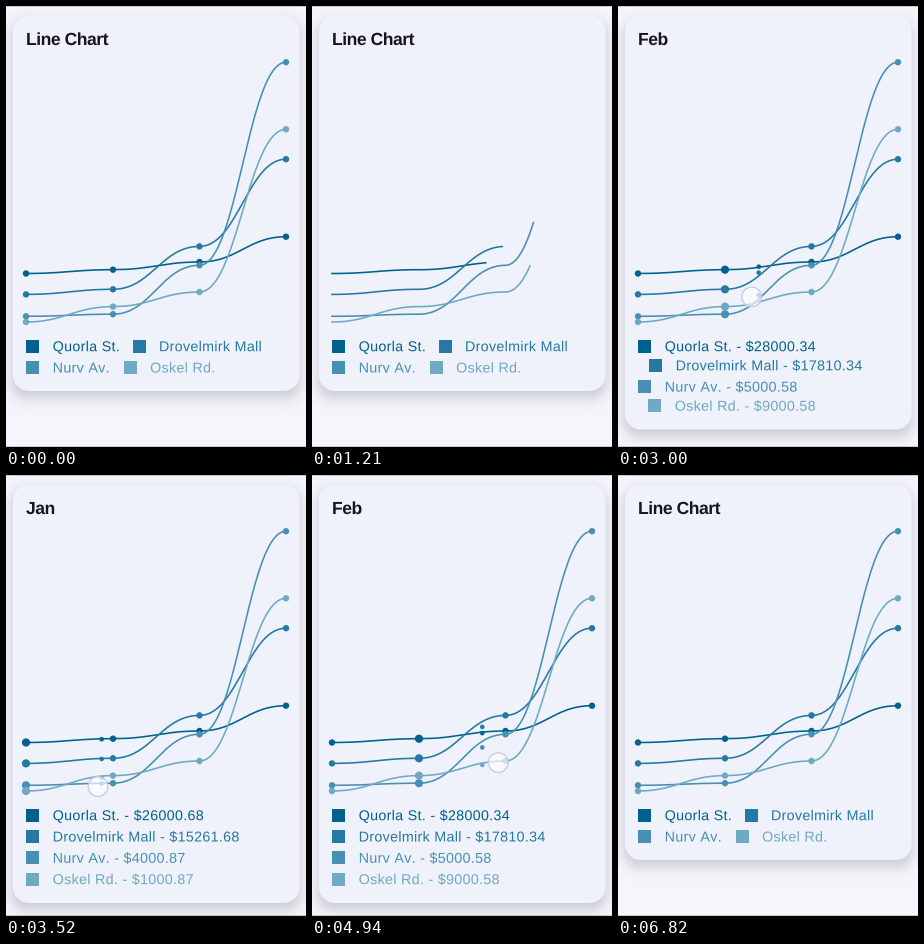
Animation, 300 px wide and 441 px high, one loop 6.85 s. Source, as a matplotlib script:

```python
import numpy as np
import matplotlib.pyplot as plt
from matplotlib.animation import FuncAnimation
from matplotlib.patches import Circle, PathPatch, Rectangle
from matplotlib.path import Path
from matplotlib.textpath import TextPath

W, H = 300, 441
LOOP, STEP = 6850, 25

# timeline in ms
CLEAR, TEXT_IN, DRAW_IN, DRAW_END = 90, 150, 640, 1700
TOUCH, OPEN, RELEASE = 2610, 2760, 6420

COLORS = ["#00618f", "#2679a2", "#4890b3", "#6fa9c3"]
NAMES = ["Quorla St.", "Drovelmirk Mall", "Nurv Av.", "Oskel Rd."]
MONTHS = ["Jan", "Feb", "Mar", "Apr"]
VALUES = [
    ["26000.68", "28000.34", "32000.57", "45000.57"],
    ["15261.68", "17810.34", "40000.0", "85000.0"],
    ["4000.87", "5000.58", "30500.58", "135000.58"],
    ["1000.87", "9000.58", "16500.87", "100444.87"],
]
XS = np.array([20, 107, 193.5, 280])
YS = np.array([
    [267.5, 263.7, 256, 230.7],
    [288.4, 283.3, 240.4, 153.2],
    [310.3, 308.2, 259.3, 56.2],
    [316, 300.6, 286, 123.3],
])
TENSION = 0.44  # reach of the level bezier handles
LAG = 75        # ms the probe trails the finger

# legend square corners: wrapped row layout and expanded list layout
WRAPPED = np.array([[20.3, 333.7], [126.6, 333.7], [20.3, 355], [117.7, 355]])
LISTED = np.array([[20.3, 333.7], [20.3, 355], [20.3, 376.3], [20.3, 397.6]])

# finger track: time, x, y
TRACK = np.array([
    [2760, 157.5, 279.5], [3420, 96, 309], [3520, 92, 312], [4130, 58, 318],
    [4390, 58, 318], [4940, 188, 288.5], [5780, 299, 200],
])


def ramp(t, start, end):
    return float(np.clip((t - start) / (end - start), 0, 1))


def ease(u):
    return 2 * u * u if u < 0.5 else 1 - 2 * (1 - u) ** 2


def finger(t):
    """Finger position, with the corners of the track rounded off."""
    ts = t + np.linspace(-60, 60, 7)
    return [np.interp(ts, TRACK[:, 0], TRACK[:, k]).mean() for k in (1, 2)]


def curve(ys):
    """Smooth line with level tangents at each data point, plus its arc length."""
    u = np.linspace(0, 1, 50)
    v = 1 - u
    px = 3 * TENSION * u * v * v + 3 * (1 - TENSION) * u * u * v + u ** 3
    py = u * u * (3 - 2 * u)
    x = np.concatenate([a + (b - a) * px for a, b in zip(XS, XS[1:])])
    y = np.concatenate([a + (b - a) * py for a, b in zip(ys, ys[1:])])
    length = np.append(0, np.cumsum(np.hypot(np.diff(x), np.diff(y))))
    return x, y, length / length[-1]


def trim(line, part):
    x, y, s = line
    n = np.searchsorted(s, part)
    return (np.append(x[:n], np.interp(part, s, x)),
            np.append(y[:n], np.interp(part, s, y)))


advances, outlines = {}, {}


def glyph(text, x, size, weight):
    prop = {"family": "Liberation Sans", "weight": weight}
    return TextPath((x, 0), text, size=size, prop=prop)


def advance(ch, size, weight):
    key = ch, size, weight
    if key not in advances:
        wide, bare = (glyph(s, 0, size, weight).get_extents().width
                      for s in (f"|{ch}|", "||"))
        advances[key] = wide - bare
    return advances[key]


def outline(text, size, tracking, weight="normal"):
    """Letter-spaced text as vertices (y down) and codes."""
    key = text, size, weight
    if key not in outlines:
        verts, codes, x = [], [], 0
        for ch in text:
            if ch != " ":
                g = glyph(ch, x, size, weight)
                verts.append(g.vertices * [1, -1])
                codes.append(g.codes)
            x += advance(ch, size, weight) + tracking
        outlines[key] = np.concatenate(verts), np.concatenate(codes)
    return outlines[key]


def place(patch, shape, x, y):
    patch.set_path(Path(shape[0] + [x, y], shape[1]))


gy, gx = np.mgrid[0:H, 0:W] + 0.5


def card_distance(bottom, shift, radius=16):
    left, right, top = 7, 293.5, 9.5 + shift
    bottom += shift
    qx = np.abs(gx - (left + right) / 2) - (right - left) / 2 + radius
    qy = np.abs(gy - (top + bottom) / 2) - (bottom - top) / 2 + radius
    outside = np.hypot(np.maximum(qx, 0), np.maximum(qy, 0))
    return outside + np.minimum(np.maximum(qx, qy), 0) - radius


def backdrop(bottom):
    """Page, soft card shadow and card."""
    img = np.ones((H, W, 3)) * [0.962, 0.966, 0.986]
    img[[0, -1]] = [0.79, 0.79, 0.82]
    shade = 0.22 / (1 + np.exp(card_distance(bottom, 6) * 0.23))[..., None]
    img = img * (1 - shade) + np.array([0.1, 0.1, 0.18]) * shade
    card = np.clip(0.5 - card_distance(bottom, 0), 0, 1)[..., None]
    return img * (1 - card) + np.array([0.939, 0.952, 0.982]) * card


fig = plt.figure(figsize=(W / 72, H / 72), dpi=72)
ax = fig.add_axes([0, 0, 1, 1])
ax.set_axis_off()
CLOSED_BOTTOM, OPEN_BOTTOM = 385, 428
page = ax.imshow(backdrop(CLOSED_BOTTOM), extent=(0, W, H, 0),
                 interpolation="nearest", aspect="auto")
ax.set_xlim(0, W)
ax.set_ylim(H, 0)


def ink(color):
    blank = Path(np.zeros((1, 2)))
    return ax.add_patch(PathPatch(blank, facecolor=color, lw=0))


curves = [curve(ys) for ys in YS]
lines = [ax.plot([], [], color=c, lw=1.6, zorder=3)[0] for c in COLORS]
dots = ax.scatter(np.tile(XS, 4), YS.ravel(), c=np.repeat(COLORS, 4),
                  linewidths=0, zorder=4)
probes = ax.scatter(np.zeros(4), np.zeros(4), s=4.6 ** 2, c=COLORS,
                    linewidths=0, zorder=4)
title = ink("#16161f")
squares = [ax.add_patch(Rectangle((0, 0), 13, 13, facecolor=c, lw=0))
           for c in COLORS]
labels = [ink(c) for c in COLORS]
cursor = ax.add_patch(Circle((0, 0), 9.8, facecolor=(1, 1, 1, 0.65),
                             edgecolor=(0.78, 0.79, 0.91, 0.9), lw=1.5,
                             zorder=5))
shown = {"bottom": CLOSED_BOTTOM}


def update(i):
    t = i * STEP + 15
    active = OPEN <= t < RELEASE

    # card and legend layout
    spread = ease(ramp(t, OPEN, OPEN + 330)) - ease(ramp(t, RELEASE, 6820))
    bottom = CLOSED_BOTTOM + (OPEN_BOTTOM - CLOSED_BOTTOM) * spread
    if bottom != shown["bottom"]:
        page.set_data(backdrop(bottom))
        shown["bottom"] = bottom

    # touch
    cursor.center = finger(t)
    cursor.set_visible(TOUCH <= t < RELEASE)
    probe = min(max(finger(t - LAG)[0], XS[0]), XS[-1])
    month = int(np.searchsorted(XS, probe, side="right")) - 1
    probes.set_offsets([(probe, np.interp(probe, XS, ys)) for ys in YS])
    probes.set_visible(active)

    # text
    alpha = 1 if t < CLEAR else ramp(t, TEXT_IN, TEXT_IN + 300)
    heading = MONTHS[month] if active else "Line Chart"
    place(title, outline(heading, 17.5, -0.45, "bold"), 20, 39)
    corners = WRAPPED + (LISTED - WRAPPED) * spread
    for k, (cx, cy) in enumerate(corners):
        text = NAMES[k] + (f" - ${VALUES[k][month]}" if active else "")
        squares[k].set_xy((cx, cy))
        place(labels[k], outline(text, 14.3, 0.3), cx + 26.4, cy + 11.5)
    for part in [title, *squares, *labels]:
        part.set_alpha(alpha)

    # lines and data points
    drawn = 1 if t < CLEAR else ease(ramp(t, DRAW_IN, DRAW_END))
    for line, c in zip(lines, curves):
        line.set_data(*trim(c, drawn))
        line.set_visible(drawn > 0)
    grow = 1 if t < CLEAR else ramp(t, 1550, DRAW_END)
    radius = np.full((4, 4), 3.2 * grow)
    if active:
        radius[:, month] = 4.1
    dots.set_sizes((2 * radius.ravel()) ** 2)
    dots.set_visible(grow > 0)
    return [page, *lines, dots, probes, title, *squares, *labels, cursor]


anim = FuncAnimation(fig, update, frames=LOOP // STEP, interval=STEP,
                     repeat=True, repeat_delay=0, blit=False)
plt.show()
```
